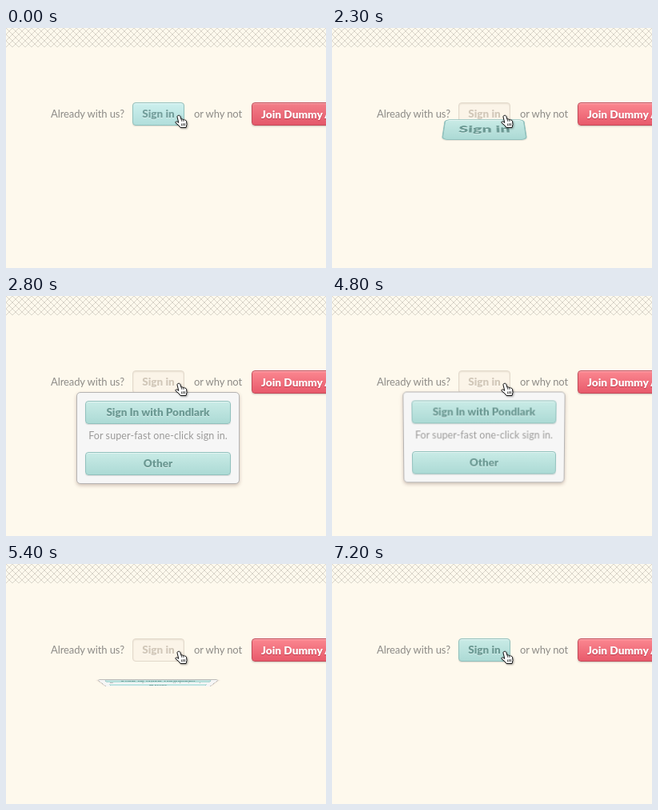
Animation of 400 by 300 pixels, one loop 7.3 s. Source, as an HTML page:

```html
<!DOCTYPE html>
<html lang="en">
<head>
<meta charset="utf-8">
<title>Sign-in flip</title>
<style>
  html, body { margin: 0; width: 100%; height: 100%; overflow: hidden; background: #fef9ed; }
  #stage {
    position: relative; width: 400px; height: 300px; overflow: hidden;
    background: #fef9ed; font: 13px/29px Lato, sans-serif; color: #8d8b87;
  }
  #stage > *, #panel > * { position: absolute; box-sizing: border-box; white-space: nowrap; }
  .label { top: 93px; letter-spacing: -.1px; }
  .button {
    height: 29px; line-height: 27px; border: 1px solid #91c1bd; border-radius: 4px;
    background: linear-gradient(#c9ebe6, #acdad5); color: #6b9993;
    font-size: 13.5px; font-weight: 900; text-align: center;
    text-shadow: 0 1px rgba(255, 255, 255, .45);
    box-shadow: inset 0 1px rgba(255, 255, 255, .5), 0 1px 1px rgba(0, 0, 0, .12);
  }
  .spot { left: 158px; top: 93px; width: 65px; }
  #slot {
    background: #fbf4e8; border-color: #e2d9cb; color: #d2c8b9;
    box-shadow: inset 0 1px 2px rgba(120, 100, 70, .14);
  }
  #sign.pale { background: linear-gradient(#cdf0ee, #b1dedb); color: #74a09d; }
  #join {
    left: 307px; top: 93px; width: 130px; padding-left: 11px; text-align: left; font-size: 13.7px;
    background: linear-gradient(#fb8790, #e85a6b); border-color: #c34b59; color: #fff;
    text-shadow: 0 1px 1px rgba(150, 30, 45, .55);
    box-shadow: inset 0 1px rgba(255, 255, 255, .3), 0 1px 2px rgba(0, 0, 0, .2);
  }
  #join.deep { background: linear-gradient(#f37f89, #e4586a); }
  #panel {
    left: 88px; top: 120px; width: 204px; height: 115px;
    background: #f6f6f6; border: 1px solid #b5b3b2; border-radius: 5px;
    box-shadow: 0 2px 4px rgba(90, 50, 40, .28);
  }
  #panel .button { left: 10px; width: 182px; }
  #panel p {
    left: 0; top: 39px; width: 100%; margin: 0; text-align: center;
    font-size: 12.5px; letter-spacing: .1px; color: #9b9a99;
  }
</style>
</head>
<body>
<div id="stage">
  <svg style="left:0;top:0" width="400" height="24">
    <pattern id="lattice" width="8" height="8" patternUnits="userSpaceOnUse">
      <path d="M-1-1L9 9M9-1L-1 9" stroke="#d5d0c5" stroke-width=".9"/>
    </pattern>
    <rect width="400" height="24" fill="url(#lattice)"/>
  </svg>
  <div class="label" style="left:56px">Already with us?</div>
  <div class="label" style="left:235px">or why not</div>
  <div id="join" class="button">Join Dummy A</div>
  <div id="slot" class="button spot">Sign in</div>
  <div id="sign" class="button spot">Sign in</div>
  <div id="panel">
    <div class="button" style="top:10px">Sign In with Pondlark</div>
    <p>For super-fast one-click sign in.</p>
    <div class="button" style="top:74px">Other</div>
  </div>
  <svg style="left:211px;top:108px;filter:drop-shadow(1px 1px 1px rgba(0,0,0,.35))" width="18" height="20">
    <path d="M4 1.5C5.2.9 6.4 1.3 6.8 2.6L8 6.2C9 5.6 10 5.9 10.4 6.6 11.3 6.1 12.3 6.5 12.6 7.3 13.7 7 14.5 7.8 14.6 9L15 12.5 14 16.5H7L5 13.8 1 10.5C.4 9 2 8.4 3.2 9.2L4.8 10.4 3 3C3 2 3.5 1.6 4 1.5Z"
      fill="#fff" stroke="#111" stroke-linejoin="round"/>
    <path d="M8 6.2l.8 2.6M10.4 6.6l.7 2.3M8.4 11.5l.5 3M10.4 11.2l.4 3M12.3 11l.2 3" stroke="#111" stroke-width=".8"/>
  </svg>
</div>
<script>
  const LOOP = 7300, DEPTH = 500;
  const SMALL = 65, LARGE = 203, DROP = 69;
  const [sign, panel, join] = ['sign', 'panel', 'join'].map(id => document.getElementById(id));

  // The standard CSS "ease" curve
  function ease(x) {
    if (x <= 0) return 0;
    if (x >= 1) return 1;
    let low = 0, high = 1;
    for (let i = 0; i < 24; i++) {
      const s = (low + high) / 2;
      if (.75 * s - .75 * s * s + s ** 3 < x) low = s; else high = s;
    }
    return .3 * low * (1 - low) ** 2 + 3 * low * low * (1 - low) + low ** 3;
  }

  // Motion advances in 100 ms steps, with two longer holds while settling
  function step(t) {
    const s = Math.floor(t / 100) * 100;
    return s === 6400 || s === 6600 ? s - 100 : s;
  }

  const openness = t => t < 4700 ? ease((t - 2185) / 600) : 1 - ease((t - 4740) / 2430);

  const pose = (y, angle, scale) =>
    `translateY(${y}px) perspective(${DEPTH}px) rotateX(${angle}deg) scale(${scale})`;

  function draw(now) {
    const t = step(now % LOOP);
    const p = openness(t);
    const angle = 180 * p + 7 * Math.sin(2 * Math.PI * p);
    const width = SMALL + (LARGE - SMALL) * p;
    const flipped = angle >= 90;

    sign.style.visibility = flipped ? 'hidden' : 'visible';
    panel.style.visibility = flipped ? 'visible' : 'hidden';
    sign.style.transform = p ? pose(DROP * p, angle, width / SMALL) : 'none';
    panel.style.transform = p < 1
      ? pose(DROP * (p - 1) + 3 * Math.sin(Math.PI * p), angle - 180, width / LARGE)
      : 'none';
    sign.classList.toggle('pale', t < 1000);
    join.classList.toggle('deep', t < 1500);
  }

  const start = performance.now();
  function tick() {
    draw(performance.now() - start);
    requestAnimationFrame(tick);
  }
  tick();
</script>
</body>
</html>
```
